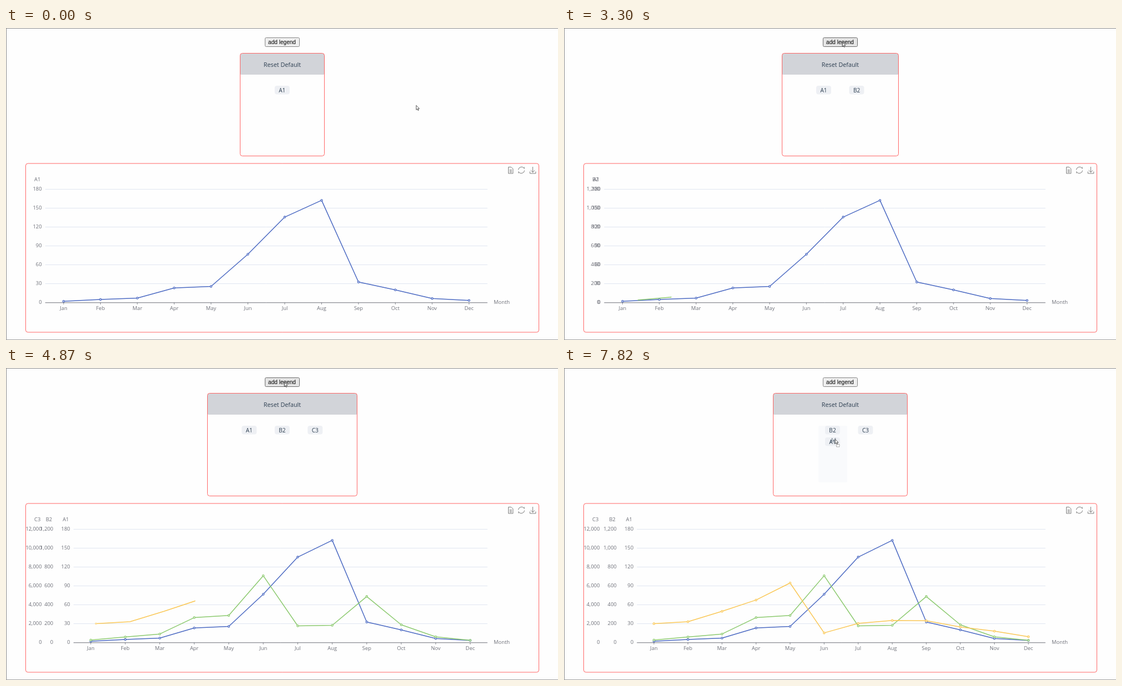
An HTML page with a canvas for the animation above (8 s loop, 996x562 px).

```html
<!DOCTYPE html>
<html lang="en">
<head>
<meta charset="utf-8">
<title>Add legend chart</title>
<style>
  html, body { margin: 0; width: 100%; height: 100%; overflow: hidden; background: #fefefe; }
  canvas { display: block; }
</style>
</head>
<body>
<canvas id="stage" width="996" height="562"></canvas>
<script>
const ctx = document.getElementById('stage').getContext('2d');
const LOOP = 8000, LEFT = 70.7, RIGHT = 868.7, BASE = 494.5, STEP = 34.05, AXIS_GAP = 30.4;
const SANS = '"Open Sans", "Noto Sans", sans-serif', ARIAL = '"Liberation Sans", Arial, sans-serif';
const INK = '#2c3e50', GREY = '#6e7079', PAPER = '#fefefe', RED = '#ff4040';
const DRAG = 7160, DROP = 7550;
const MONTHS = 'Jan Feb Mar Apr May Jun Jul Aug Sep Oct Nov Dec'.split(' ');
const SERIES = [
  { name: 'A1', color: '#4d6bc3', max: 180, start: -LOOP,
    data: [2, 4.9, 7, 23.2, 25.6, 76.7, 135.6, 162.2, 32.6, 20, 6.4, 3.3] },
  { name: 'B2', color: '#8dca70', max: 1200, start: 3180,
    data: [26, 59, 90, 264, 287, 707, 176, 182, 487, 188, 60, 23] },
  { name: 'C3', color: '#fac858', max: 12000, start: 4586,
    data: [2000, 2200, 3300, 4500, 6300, 1020, 2030, 2340, 2300, 1650, 1200, 620] }
];
// Pointer path: time, x, y
const PATH = [
  [0, 740, 139], [260, 705, 139], [780, 705, 139], [1500, 553, 101], [2520, 502, 25],
  [5400, 502, 25], [6420, 443, 112], [7040, 442, 112], [7670, 489, 128], [LOOP, 489, 128]
];

const clamp = v => Math.max(0, Math.min(1, v));
const mix = (a, b, p) => a + (b - a) * p;
const cubicInOut = p => p < .5 ? 4 * p ** 3 : 1 - 4 * (1 - p) ** 3;
const shift = (t, s) => cubicInOut(clamp((t - s.start) / 500));
const crisp = v => Math.floor(v) + .5;

function pointer(t) {
  const i = PATH.findIndex(k => k[0] > t), [t0, x0, y0] = PATH[i - 1], [t1, x1, y1] = PATH[i];
  const p = (t - t0) / (t1 - t0);
  return [mix(x0, x1, p), mix(y0, y1, p)];
}

function text(str, x, y, size, color = GREY, align = 'center', font = SANS) {
  ctx.font = `${size}px ${font}`;
  ctx.textAlign = align;
  ctx.fillStyle = color;
  ctx.fillText(str, x, y);
}

function box(x, y, w, h, r, fill, stroke, width = 1) {
  ctx.beginPath();
  ctx.roundRect(x, y, w, h, r);
  if (fill) { ctx.fillStyle = fill; ctx.fill(); }
  if (stroke) { ctx.strokeStyle = stroke; ctx.lineWidth = width; ctx.stroke(); }
}

function line(x0, y0, x1, y1, color, width = 1) {
  ctx.beginPath();
  ctx.moveTo(x0, y0);
  ctx.lineTo(x1, y1);
  ctx.strokeStyle = color;
  ctx.lineWidth = width;
  ctx.stroke();
}

function shape(d, stroke, fill, width = .9) {
  const p = new Path2D(d);
  if (fill) { ctx.fillStyle = fill; ctx.fill(p); }
  ctx.strokeStyle = stroke;
  ctx.lineWidth = width;
  ctx.stroke(p);
}

function chip(label, x, y) {
  box(x - 13.5, y, 27, 15.5, 4, '#eef0f4');
  text(label, x, y + 12, 10.1, INK);
}

function drawButton(t, [x, y]) {
  const hover = x > 467 && x < 530 && y > 17 && y < 34;
  const down = SERIES.some(s => t < s.start && t > s.start - 100);
  const [fill, edge] = down ? ['#f5f5f5', '#909090'] : hover ? ['#e5e5e5', '#6c6c6c'] : ['#efefef', '#868686'];
  box(467.5, 17.5, 62, 16, 2, fill, edge);
  text('add legend', 498, 29, 10.1, '#000', 'center', ARIAL);
}

function drawPanel(t, count) {
  const moved = t >= DROP;
  const half = moved ? 121.4 : 46 + 29.7 * count;
  const left = crisp(498.4 - half), w = crisp(498.4 + half) - left;
  box(left, 46, w, 38, [4, 4, 2, 2], '#d2d4d9');
  box(left, 45.5, w, 185, 4, null, RED, .8);
  text('Reset Default', 498.5, 70, 10.8, INK);
  if (moved) {
    box(459, 104, 52, 102, 3, '#f9fafc');
    chip('B2', 484.5, 104);
    chip('C3', 544, 104);
    chip('A1', 484.5, 125);
  } else {
    for (let i = 0; i < count; i++) chip(SERIES[i].name, 498.3 + (i - (count - 1) / 2) * 59.5, 104);
  }
}

function drawLine(s, left, clipX) {
  const band = (RIGHT - left) / 12;
  const pts = s.data.map((v, i) => [left + (i + .5) * band, BASE - v / s.max * 6 * STEP]);
  ctx.save();
  ctx.beginPath();
  ctx.rect(0, 240, clipX, 300);
  ctx.clip();
  ctx.beginPath();
  pts.forEach(p => ctx.lineTo(...p));
  ctx.strokeStyle = s.color;
  ctx.lineWidth = 1.5;
  ctx.lineJoin = 'bevel';
  ctx.stroke();
  ctx.restore();
  for (const [x, y] of pts) {
    const k = clamp((clipX - x - 30) / 200);
    if (k) box(x - 1.6 * k, y - 1.6 * k, 3.2 * k, 3.2 * k, 1.6 * k, '#fff', s.color, 1.3 * k);
  }
}

function drawChart(t, shown) {
  box(35.5, 244, 926, 304, 4, null, RED, .8);
  const icon = '#707070';
  shape('M906.5 250.5h5l3.3 3.3v8.2h-8.3zM908.5 255.7h4.3m-4.3 2.1h4.3m-4.3 2.1h4.3', icon);
  shape('M924.4 255.5a5.7 5.7 0 0 1 10.7-2.2v-3m.5 6.2a5.7 5.7 0 0 1-10.7 2.2v3', icon);
  shape('M950.5 250v9.8m-3.8-3.6l3.8 3.7 3.8-3.7M945.3 258.5v3.5h10.5v-3.5', icon);

  const axisX = j => LEFT + AXIS_GAP * SERIES.slice(j + 1).reduce((sum, s) => sum + shift(t, s), 0);
  const left = axisX(0), band = (RIGHT - left) / 12;
  for (let k = 1; k <= 6; k++) {
    const y = crisp(BASE - k * STEP);
    line(left, y, RIGHT, y, '#e0e6f1');
  }
  line(left, BASE + .3, RIGHT, BASE + .3, GREY);
  MONTHS.forEach((m, i) => {
    const x = left + (i + .5) * band;
    line(x, BASE, x, BASE + 3.5, GREY, .8);
    text(m, x, 507.8, 9.4);
  });
  text('Month', 880, 497.3, 9.4, GREY, 'left');
  shown.forEach((s, j) => {
    const x = axisX(j);
    text(s.name, x - 14, 276, 9.4);
    for (let k = 0; k <= 6; k++) {
      text((s.max / 6 * k).toLocaleString('en-US'), x - 6.2, BASE + 2.8 - k * STEP, 9.4, GREY, 'right');
    }
  });
  // A new line is uncovered from left to right in its final place
  shown.forEach((s, j) => {
    const p = (t - s.start) / 1000, fresh = p < 1;
    const x0 = fresh ? LEFT + AXIS_GAP * j : left;
    drawLine(s, x0, fresh ? mix(x0, RIGHT, p) : 1200);
  });
}

function drawPointer(t, [x, y]) {
  const dragging = t >= DRAG;
  if (dragging) {
    ctx.globalAlpha = .6;
    text('A1', x - 2.5, y + 5.5, 10.1, INK);
    ctx.globalAlpha = 1;
  }
  ctx.save();
  ctx.translate(x, y);
  if (!dragging && x < 452) {
    for (let i = 0; i < 4; i++) {
      shape('M-.7-.7V-3.6H-2.3L0-6 2.3-3.6H.7V-.7', '#222', '#fff', .7);
      ctx.rotate(Math.PI / 2);
    }
  } else {
    shape('M.3.4V8.4L2.2 6.7 3.5 9.6 4.8 9 3.5 6.2H6z', '#222', '#fff', .75);
    if (dragging) {
      ctx.setLineDash([1, 1]);
      box(2.5, 9.5, 5.5, 4.5, 0, '#fff', '#444', .8);
    }
  }
  ctx.restore();
}

function draw() {
  const t = performance.now() % LOOP;
  const pos = pointer(t), shown = SERIES.filter(s => t >= s.start);
  ctx.fillStyle = PAPER;
  ctx.fillRect(0, 0, 996, 562);
  line(0, .5, 996, .5, '#8c8c8c');
  line(.5, 0, .5, 562, '#8c8c8c');
  line(0, 561.5, 996, 561.5, '#a0a0a0');
  drawButton(t, pos);
  drawPanel(t, shown.length);
  drawChart(t, shown);
  drawPointer(t, pos);
  requestAnimationFrame(draw);
}
draw();
</script>
</body>
</html>
```
